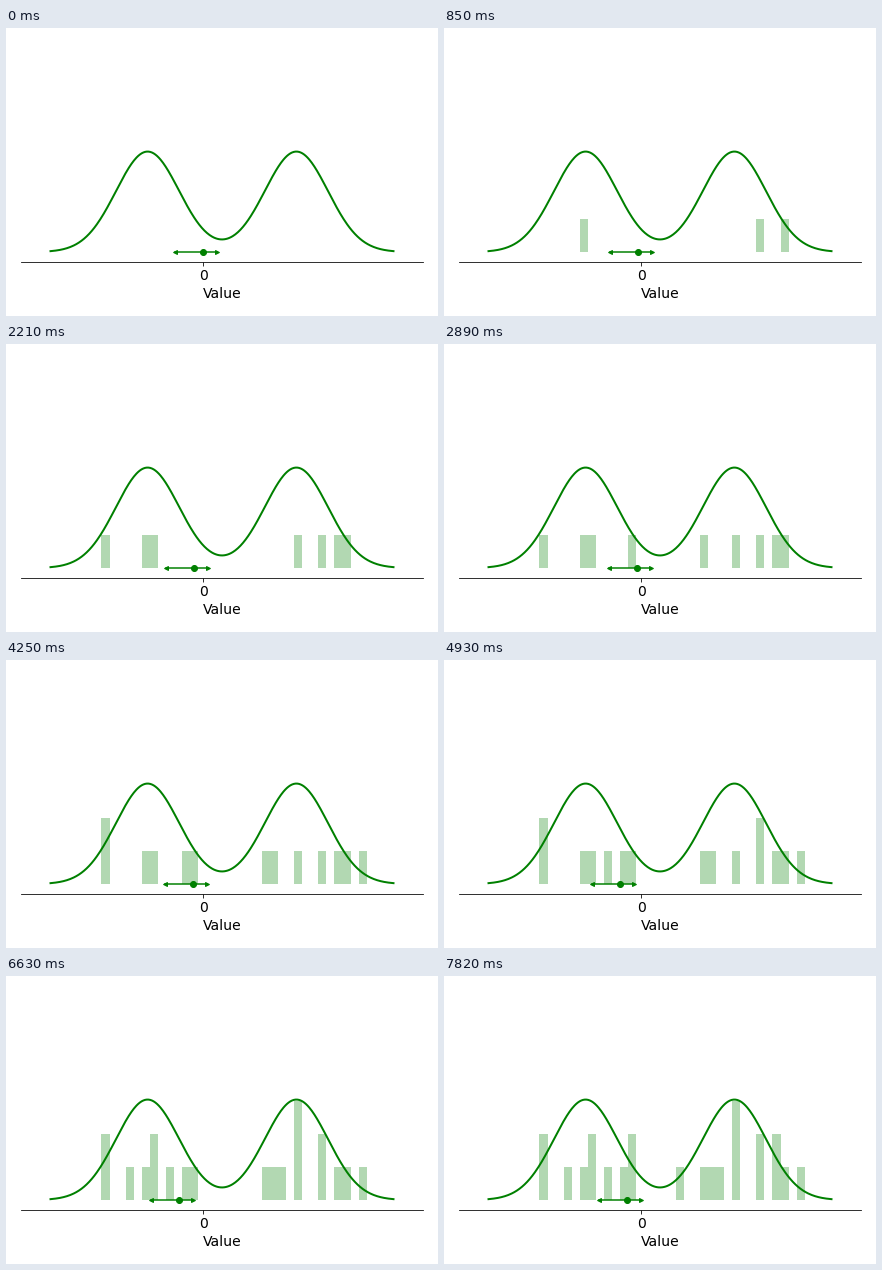
Recreate the animation shown at these times as a matplotlib script. Size 432 px wide and 288 px high, loop 7990 ms.

```python
import matplotlib.pyplot as plt
import numpy as np
from matplotlib.animation import FuncAnimation

W, H, DPI = 432, 288, 72
FRAMES, INTERVAL = 47, 170
PAD, BOTTOM = 15.12, 54

X_MIN, X_MAX, N_BINS = -9.8, 11.8, 50
PEAKS, SIGMA, HEIGHT = (-3, 5), 1.7, 3.03
STEP_UP, STEP_DOWN = 0.134, 0.296
ARM_LEFT, ARM_RIGHT = 1.505, 0.753

# Bin hit by each successive sample
HITS = [40, 15, 37, 39, 16, 10, 34, 30, 21, 42, 20, 31,
        10, 18, 37, 16, 34, 32, 13, 34, 21, 39, 27]

edges = np.linspace(X_MIN, X_MAX, N_BINS + 1)
centers = (edges[:-1] + edges[1:]) / 2

# Estimate after each sample: fixed, asymmetric steps up or down
estimates = [0.0]
for hit in HITS:
    value = estimates[-1]
    step = STEP_UP if centers[hit] > value else -STEP_DOWN
    estimates.append(value + step)

plt.rcParams.update({"font.family": "DejaVu Sans", "font.size": 14})
fig = plt.figure(figsize=(W / DPI, H / DPI), dpi=DPI, facecolor="white")
ax = fig.add_axes([PAD / W, BOTTOM / H,
                   (W - 2 * PAD) / W, (H - PAD - BOTTOM) / H])
ax.set_xlim(X_MIN, X_MAX)
ax.set_ylim(-0.3, 6.3)
ax.set_xticks([0], ["0"])
ax.set_yticks([])
ax.set_xlabel("Value")
for side in ("left", "right", "top"):
    ax.spines[side].set_visible(False)

x = np.linspace(1 - 9.22, 1 + 9.22, 400)
density = sum(np.exp(-((x - p) / SIGMA) ** 2 / 2) for p in PEAKS)
ax.plot(x, HEIGHT * density, color="green", lw=2)

bars = ax.bar(edges[:-1], np.zeros(N_BINS), width=np.diff(edges),
              align="edge", color="green", alpha=0.3)
arm, = ax.plot([], [], color="green", lw=1.5)
dot, = ax.plot([], [], "o", color="green", ms=6)
left, = ax.plot([], [], "<", color="green", ms=4)
right, = ax.plot([], [], ">", color="green", ms=4)


def draw(frame):
    # A sample lands on odd frames, the estimate reacts on even ones
    counts = np.bincount(HITS[:(frame + 1) // 2], minlength=N_BINS)
    for bar, count in zip(bars, counts):
        bar.set_height(count)
    value = estimates[frame // 2]
    lo, hi = value - ARM_LEFT, value + ARM_RIGHT
    arm.set_data([lo, hi], [0, 0])
    for mark, pos in ((dot, value), (left, lo), (right, hi)):
        mark.set_data([pos], [0])
    return [*bars, arm, dot, left, right]


anim = FuncAnimation(fig, draw, frames=FRAMES, init_func=lambda: draw(0),
                     interval=INTERVAL, repeat=True, repeat_delay=0)
plt.show()
```
